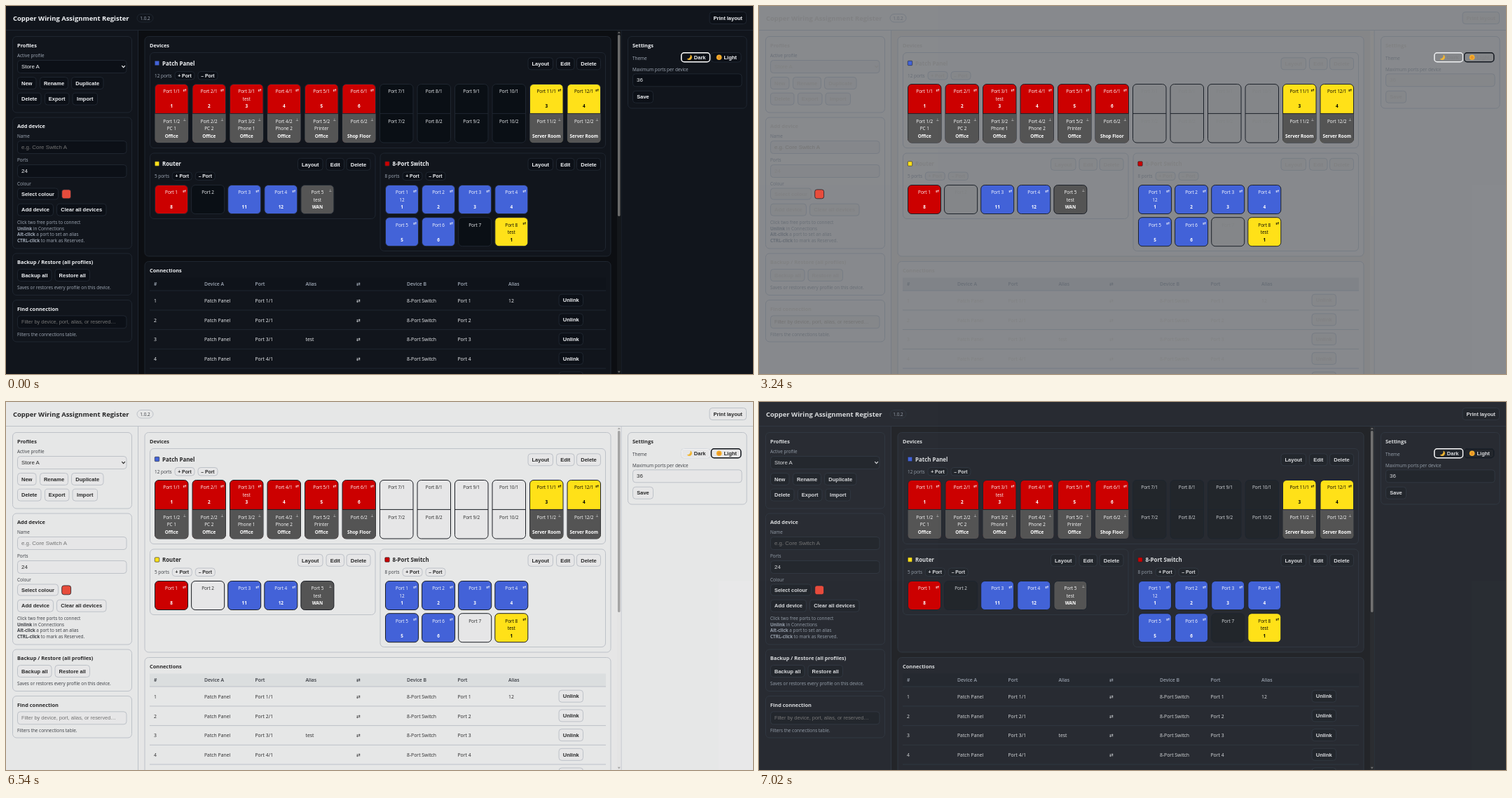
Write an HTML page that moves like this. It is 1066 px wide and 525 px high and loops after 7.08 s.

```html
<!DOCTYPE html>
<html lang="en">
<head>
<meta charset="utf-8">
<title>Copper Wiring Assignment Register</title>
<style>
html, body { margin: 0; width: 100%; height: 100%; overflow: hidden; background: #0c0e12; }
svg { position: absolute; left: 0; top: 0; width: 1066px; height: 525px; }
text { font-family: "Open Sans", "Noto Sans", sans-serif; white-space: pre; }
.ui { font-family: "Liberation Sans", Arial, sans-serif; }
.sym { font-family: "DejaVu Sans", sans-serif; }
</style>
</head>
<body>
<script>
const RED = '#cc0000', BLUE = '#4363d8', YELLOW = '#ffe119', GREY = '#555555';

const dark = {
  name: 'dark', page: '#0c0e12', panel: '#11151c', field: '#0c1017', head: '#0f131a',
  line: '#1f2630', port: '#1f2630', empty: '#0a0f15', text: '#f0f2f5', muted: '#a3acb9',
  ring: '#ffffff', thumb: '#6b6b6b', track: '#14171b'
};
const light = {
  name: 'light', page: '#ffffff', panel: '#ffffff', field: '#ffffff', head: '#f3f5f7',
  line: '#d0d4da', port: '#1c1f24', empty: '#ffffff', text: '#111111', muted: '#2c2f33',
  ring: '#0d1117', thumb: '#ababab', track: '#fcfcfc'
};

function scene(c) {
  const out = [];
  const add = s => out.push(s);

  // x, y, right and bottom are the outer edges
  const box = (x, y, right, bottom, r, fill, stroke, w = 1) => add(
    `<rect x="${x + w / 2}" y="${y + w / 2}" width="${right - x - w}" height="${bottom - y - w}" ` +
    `rx="${r}" fill="${fill}" stroke="${stroke}" stroke-width="${w}"/>`);
  const fill = (x, y, w, h, color, r = 0) =>
    add(`<rect x="${x}" y="${y}" width="${w}" height="${h}" rx="${r}" fill="${color}"/>`);

  // y is the vertical middle of the capitals
  const text = (s, x, y, size, { color = c.text, bold = 400, at = 'start', cls = '' } = {}) => add(
    `<text x="${x}" y="${(y + size * 0.36).toFixed(2)}" font-size="${size}" font-weight="${bold}" ` +
    `fill="${color}" text-anchor="${at}" class="${cls}">${s}</text>`);

  const heading = (s, x, y, size = 7.4) => text(s, x, y, size, { bold: 700 });
  const label = (s, x, y) => text(s, x, y, 6.4, { color: c.muted });
  const card = (x, y, right, bottom) => box(x, y, right, bottom, 5.5, c.panel, c.line);
  const button = (s, x, right, y, h = 18, size = 7.5) => {
    box(x, y, right, y + h, 4, c.field, c.line);
    text(s, (x + right) / 2, y + h / 2, size, { bold: 700, at: 'middle', cls: 'ui' });
  };
  const field = (s, x, y, { size = 7.9, color = c.text } = {}) => {
    box(x, y, x + 156.5, y + 19, 4, c.field, c.line);
    text(s, x + 6, y + 9.3, size, { color, cls: 'ui' });
  };

  const portText = (x, y, w, p) => {
    const color = p.color === YELLOW ? '#000' : p.color ? '#fff' : c.text;
    const mid = { color, at: 'middle' };
    const cx = x + w / 2;
    text(p.name, cx, y + 11, 6.4, mid);
    if (p.alias) text(p.alias, cx, y + 21.4, 6.4, mid);
    if (p.tag) text(p.tag, cx, y + 32, 6.4, { ...mid, bold: 700 });
    if (p.color) text(p.color === GREY ? '⊥' : '⇄', x + w - 5.5, y + 8.4, p.color === GREY ? 5 : 6,
      { ...mid, cls: 'sym' });
  };
  const port = (x, y, w, h, p) => {
    box(x, y, x + w, y + h, 5.5, p.color || c.empty, c.port);
    portText(x, y, w, p);
  };
  const stack = (x, y, w, top, low) => {
    const h = 84.5, half = 42.4;
    box(x, y, x + w, y + h, 5.5, top.color || c.empty, c.port);
    if (low.color) add(`<path d="M${x + 0.5} ${y + half}h${w - 1}v${h - half - 6}q0 5.5-5.5 5.5` +
      `h${12 - w}q-5.5 0-5.5-5.5z" fill="${low.color}"/>`);
    fill(x + 0.5, y + half - 0.5, w - 1, 1, c.port);
    portText(x, y, w, top);
    portText(x, y + half, w, low);
  };

  const device = (name, count, color, [x, y, right, bottom], minusX) => {
    card(x, y, right, bottom);
    box(x + 7, y + 12, x + 14, y + 19, 1, color, c.port, 0.6);
    heading(name, x + 18, y + 16, 7.9);
    label(count + ' ports', x + 7, y + 33.2);
    button('+ Port', minusX - 33, minusX - 4, y + 27, 12.5, 6.8);
    button('– Port', minusX, minusX + 29, y + 27, 12.5, 6.8);
    button('Layout', right - 111.5, right - 75, y + 7.3);
    button('Edit', right - 71, right - 44.5, y + 7.3);
    button('Delete', right - 42, right - 7, y + 7.3);
  };

  fill(0, 0, 1066, 525, c.panel);
  fill(189, 35, 689, 490, c.page);
  fill(0, 34, 1066, 1, c.line);
  fill(188, 35, 1, 490, c.line);
  fill(877.5, 35, 1, 490, c.line);

  // header
  heading('Copper Wiring Assignment Register', 10, 17.4, 9.43);
  box(186.5, 11, 210.5, 23.5, 6, c.panel, c.line);
  text('1.0.2', 198.5, 17.3, 6.4, { color: c.muted, at: 'middle' });
  button('Print layout', 1003.5, 1057, 8);

  // profiles
  card(9, 43, 180, 152.5);
  heading('Profiles', 16, 56.2);
  label('Active profile', 16, 70.5);
  field('Store A', 16, 77);
  add(`<path d="M165.3 85.2l2.3 2.4 2.3-2.4" fill="none" stroke="${c.text}" stroke-width="1.2"/>`);
  button('New', 16, 43.5, 101);
  button('Rename', 48, 89, 101);
  button('Duplicate', 93, 139.5, 101);
  button('Delete', 16, 50.5, 123.6);
  button('Export', 55, 90.5, 123.6);
  button('Import', 94.5, 131, 123.6);

  // new device form
  card(9, 158.5, 180, 346.5);
  heading('Add device', 16, 171.8);
  label('Name', 16, 186);
  field('e.g. Core Switch A', 16, 192, { color: '#757575' });
  label('Ports', 16, 220);
  field('24', 16, 226);
  label('Colour', 16, 254);
  button('Select colour', 16, 75, 259.5, 17);
  box(79.3, 261.5, 93, 275.2, 3, '#e74c3c', c.port, 0.8);
  button('Add device', 16, 68, 281.7);
  button('Clear all devices', 72, 143.5, 281.7);
  const b = s => `<tspan font-weight="700">${s}</tspan>`;
  ['Click two free ports to connect', b('Unlink') + ' in Connections',
    b('Alt-click') + ' a port to set an alias', b('CTRL-click') + ' to mark as Reserved.']
    .forEach((s, i) => label(s, 16, 308.3 + i * 8.9));

  // backup and search
  card(9, 352.5, 180, 413);
  heading('Backup / Restore (all profiles)', 16, 365.6);
  button('Backup all', 16, 65.5, 375);
  button('Restore all', 69.5, 120, 375);
  label('Saves or restores every profile on this device.', 16, 402);
  card(9, 419, 180, 479.5);
  heading('Find connection', 16, 432.3);
  field('Filter by device, port, alias, or reserved…', 16, 441.3, { size: 7.4, color: '#757575' });
  label('Filters the connections table.', 16, 468.7);

  // devices
  card(197.5, 43, 863.5, 357.5);
  heading('Devices', 205, 56.2);
  device('Patch Panel', 12, BLUE, [205, 66, 856, 203], 273.5);
  const users = ['PC 1', 'PC 2', 'Phone 1', 'Phone 2', 'Printer'];
  for (let i = 0; i < 12; i++) {
    const n = i + 1, used = i < 6 || i > 9;
    stack(212 + i * 53.5, 111, 48.5,
      { name: `Port ${n}/1`, color: i < 6 ? RED : used && YELLOW,
        alias: n === 3 && 'test', tag: used && (i < 6 ? n : n - 8) },
      { name: `Port ${n}/2`, color: used && GREY, alias: users[i],
        tag: used && (i < 5 ? 'Office' : i < 6 ? 'Shop Floor' : 'Server Room') });
  }
  device('Router', 5, YELLOW, [205, 209.5, 527.5, 304], 269.8);
  [[RED, 8], [], [BLUE, 11], [BLUE, 12], [GREY, 'WAN', 'test']].forEach(([color, tag, alias], i) =>
    port(212 + i * 52.1, 255, 48, 42, { name: `Port ${i + 1}`, color, tag, alias }));
  device('8-Port Switch', 8, RED, [533.5, 209.5, 856, 350], 598.5);
  for (let i = 0; i < 8; i++) {
    const n = i + 1, last = n === 8;
    port(541 + (i % 4) * 52.1, i < 4 ? 255 : 301.2, 48, 42, {
      name: `Port ${n}`, color: last ? YELLOW : n !== 7 && BLUE,
      alias: last ? 'test' : n === 1 && '12', tag: last ? '1' : n !== 7 && n
    });
  }

  // connections
  card(197.5, 364, 863.5, 545);
  heading('Connections', 205, 377);
  fill(205, 387.5, 651, 18.5, c.head);
  fill(205, 405.5, 651, 1, c.line);
  const cols = [211, 283, 355.5, 427.5, 500, 572, 644.5, 717];
  const row = (cells, y, opt) => cells.forEach((s, i) => s &&
    text(s, cols[i], y, 6.85, { ...opt, cls: i === 4 ? 'sym' : '' }));
  row(['#', 'Device A', 'Port', 'Alias', '⇄', 'Device B', 'Port', 'Alias'], 397,
    { color: c.muted, bold: 600 });
  for (let i = 0; i < 5; i++) {
    const n = i + 1, y = 420.4 + i * 27.7;
    row([n, 'Patch Panel', `Port ${n}/1`, n === 3 && 'test', '⇄', '8-Port Switch', `Port ${n}`,
      n === 1 && '12'], y);
    button('Unlink', 788.5, 824, y - 9.7);
    fill(205, y + 13, 651, 1, c.line);
  }

  // scrollbar
  fill(872, 35, 5.5, 490, c.track);
  fill(873, 41, 3.5, 259, c.thumb, 1.7);
  add(`<path d="M872.8 39l2-2.6 2 2.6zM872.8 520.8l2 2.6 2-2.6z" fill="${c.thumb}"/>`);

  // settings
  card(887, 43, 1057.5, 146.5);
  heading('Settings', 894, 56.2);
  label('Theme', 894, 75);
  const choice = (s, x, right, on) => {
    box(x, 66, right, 80.5, 4, c.field, on ? c.ring : c.line, on ? 1.5 : 1);
    text(s, x + 18.8, 73.2, 7.5, { bold: 700, cls: 'ui' });
  };
  choice('Dark', 963, 1005.3, c.name === 'dark');
  choice('Light', 1005.7, 1049.5, c.name === 'light');
  add('<path d="M976.6 69.6a3.9 3.9 0 1 1-4.9 5.6a4.6 4.6 0 0 0 4.9-5.6z" fill="#f2b632"/>');
  add('<circle cx="1017.6" cy="73.2" r="3.8" fill="#f6b02c"/>' +
    '<circle cx="1017.6" cy="73.4" r="2.2" fill="#e8932a"/>');
  label('Maximum ports per device', 894, 90.3);
  field('36', 894, 96.3);
  button('Save', 894, 924, 120.7);

  return `<svg viewBox="0 0 1066 525">${out.join('')}</svg>`;
}

document.body.innerHTML = scene(dark) + scene(light);

// Crossfade in tenths, one step every 60 ms
const LOOP = 7080, STEP = 60;
const frames = [{ offset: 0, opacity: 0 }];
for (let k = 1; k <= 10; k++) frames.push({ offset: (3000 + (k - 1) * STEP) / LOOP, opacity: k / 10 });
for (let k = 1; k <= 9; k++) frames.push({ offset: (6540 + (k - 1) * STEP) / LOOP, opacity: 1 - k / 10 });
frames.push({ offset: 1, opacity: 0 });
document.body.lastElementChild.animate(
  frames.map(f => ({ ...f, easing: 'step-end' })),
  { duration: LOOP, iterations: Infinity });
</script>
</body>
</html>
```
